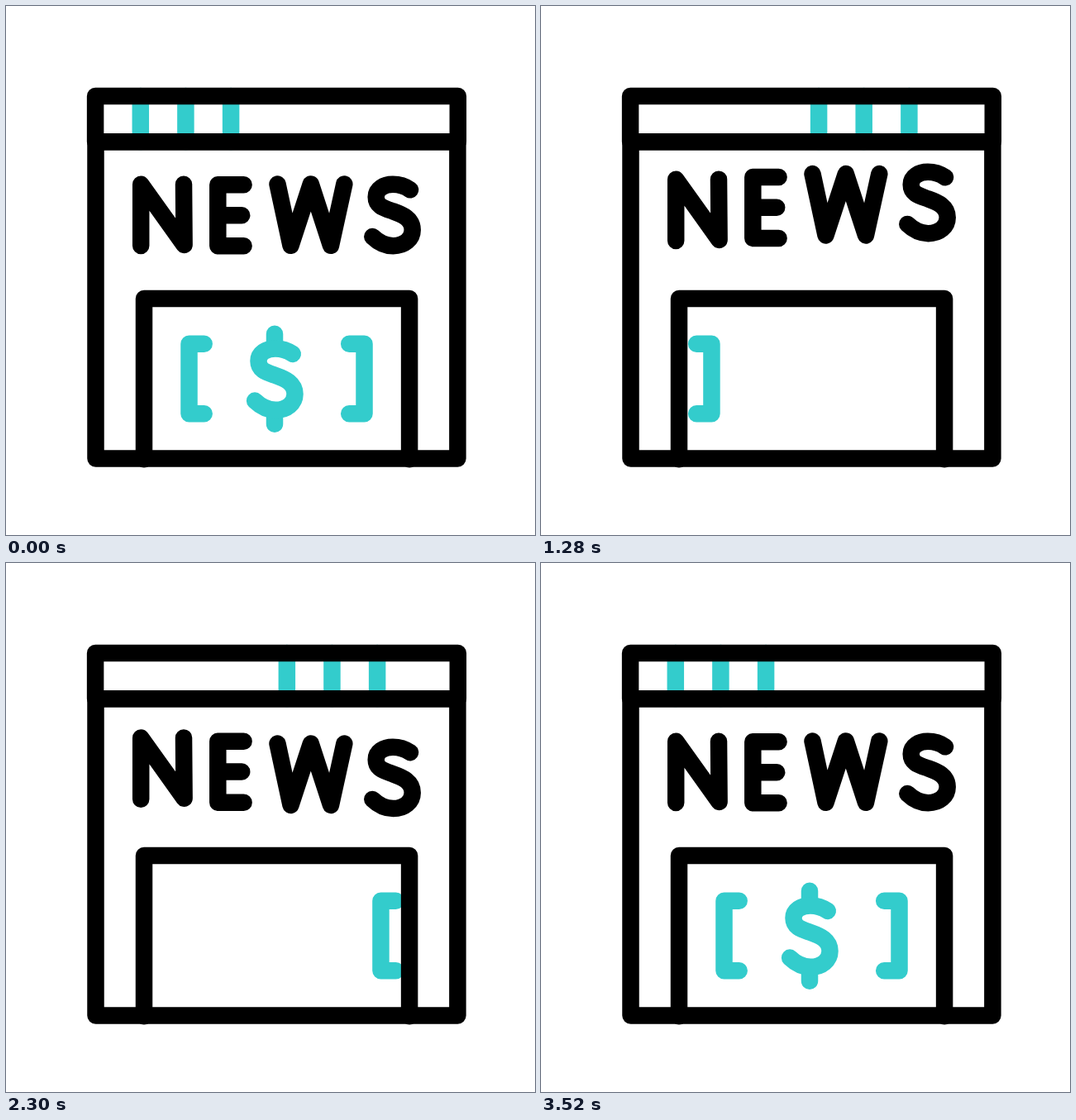
An HTML page for the animation above (3.62 s loop, 640 by 640 pixels).

```html
<!DOCTYPE html>
<html lang="en">
<head>
<meta charset="utf-8">
<title>News page icon</title>
<style>
  html, body { margin: 0; width: 100%; height: 100%; overflow: hidden; background: #fff; }
  svg { display: block; width: 100vw; height: 100vh; }
  .ink, .tint { fill: none; stroke: #000; stroke-width: 20.5; stroke-linecap: round; stroke-linejoin: round; }
  .tint { stroke: #3cc; }
</style>
</head>
<body>
<svg viewBox="0 0 640 640" role="img" aria-label="NEWS [$]">
  <defs>
    <clipPath id="pane"><rect x="167" y="354" width="321" height="194"/></clipPath>
    <path id="ess" d="M489 222.3C485 219.5 478.5 215.8 468 215.8C457 215.8 447.7 221.5 447.7 231C447.7 242 457 244.5 468 248.3C480 252.5 491.7 257.5 491.7 271C491.7 282 482 290.2 468.5 290.2C457 290.2 449 284.5 443.3 279"/>
  </defs>

  <path id="stripes" class="tint" d="M162.8 109V164M217.4 109V164M272.1 109V164"/>

  <g clip-path="url(#pane)">
    <g id="price" class="tint">
      <path d="M239.7 408.7H221.5V493.3H239.7"/>
      <path d="M415.2 408.7H433.5V493.3H415.2"/>
      <path d="M325 396.7V412M325 490V505.7"/>
      <use href="#ess" x="-142.2" y="198.6"/>
    </g>
  </g>

  <g class="ink">
    <path d="M108.1 108.9H546.8V164.2H108.1Z"/>
    <path d="M108.5 164.2H546.4V547.4H108.5Z"/>
    <path d="M167 548.2V354H488.1V548.2"/>
  </g>

  <g id="word" class="ink">
    <path d="M163.2 290V215.7L215.6 289L215 215.7"/>
    <path d="M287.6 216.3H256.3V290.3H287.6M256.3 253.2H285.2"/>
    <path d="M328.5 215.5L344.5 289.8L368.8 215.5L393 289.8L409.3 215.5"/>
    <use href="#ess"/>
  </g>
</svg>
<script>
  const LOOP = 3620, REST = 200, STEP = 20, LAST = 166;
  const HALF = 80, LAG = 2;
  const RISE = -20.3, DROP = 30.3, STRIPE_RUN = 230.5, PRICE_RUN = 302;

  const stripes = document.getElementById('stripes');
  const price = document.getElementById('price');
  const letters = [...document.getElementById('word').children];

  const clamp = (v, lo, hi) => Math.min(hi, Math.max(lo, v));
  const smooth = u => u * u * (3 - 2 * u);
  const move = (el, x, y) => el.setAttribute('transform', `translate(${x.toFixed(2)} ${y.toFixed(2)})`);

  // Eases through evenly spaced key values over the whole cycle.
  function track(keys, k) {
    const p = clamp(k / (2 * HALF), 0, 1) * (keys.length - 1);
    const i = Math.min(Math.floor(p), keys.length - 2);
    return keys[i] + (keys[i + 1] - keys[i]) * smooth(p - i);
  }

  function draw(ms) {
    const k = clamp(Math.floor((ms % LOOP - REST) / STEP), 0, LAST);
    const out = track([0, 1, 0], k);
    move(stripes, STRIPE_RUN * out, 0);
    // The price leaves on the left and comes back from the right.
    move(price, PRICE_RUN * out * (k < HALF ? -1 : 1), 0);
    letters.forEach((el, i) => move(el, 0, track([0, RISE, DROP, RISE, 0], k - i * LAG)));
  }

  const start = performance.now();
  function tick() {
    draw(performance.now() - start);
    requestAnimationFrame(tick);
  }
  tick();
</script>
</body>
</html>
```
